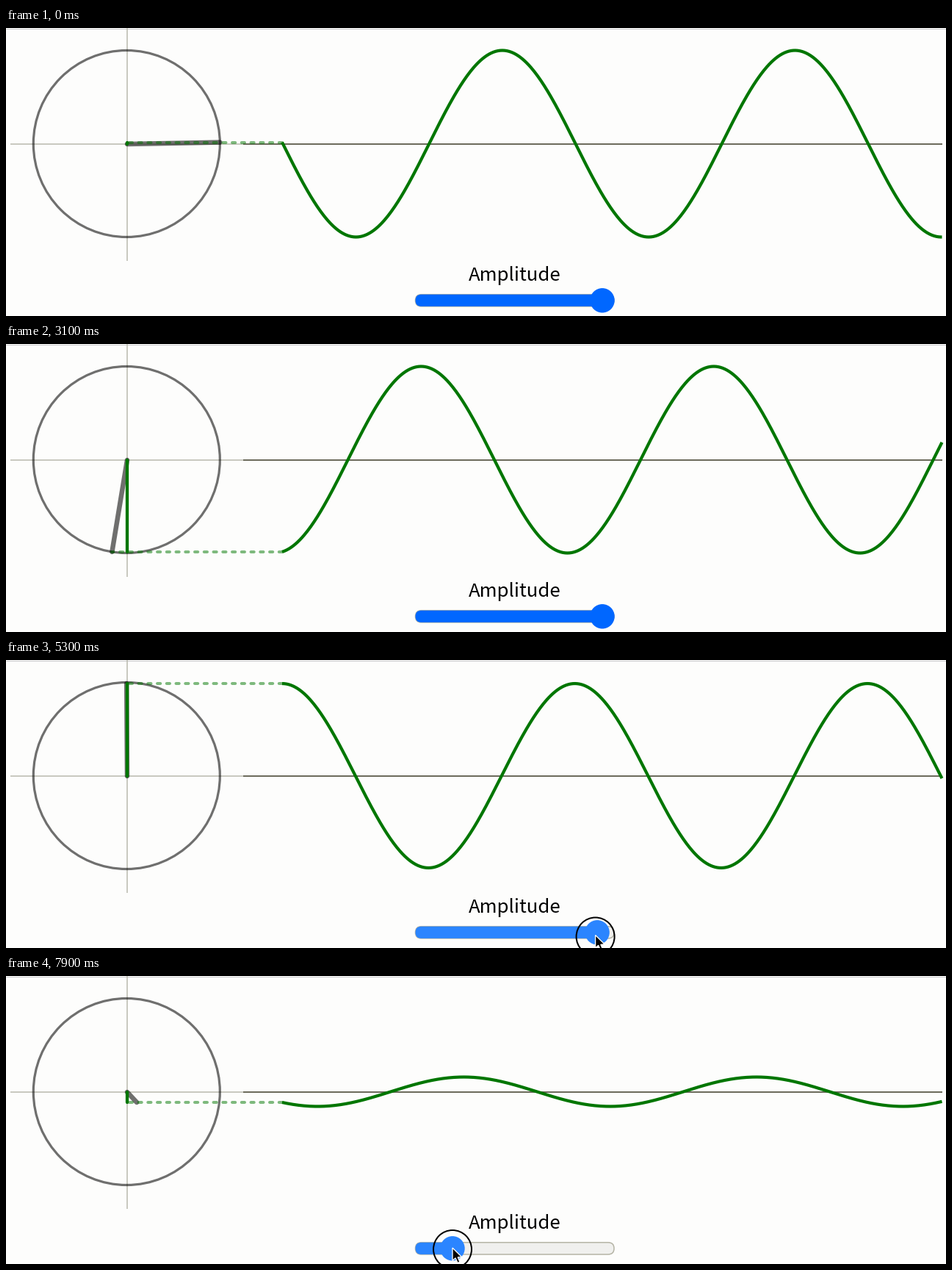
These frames come from a looping animation (1280x392 px, 8 s). A matplotlib script:

```python
import numpy as np
import matplotlib.pyplot as plt
from matplotlib.animation import FuncAnimation
from matplotlib.patches import Circle, FancyBboxPatch, Polygon

W, H, DPI = 1280, 392, 100
FRAMES, INTERVAL = 80, 100
PT = 72 / DPI

CX, CY, RADIUS = 164.3, 157.5, 127
BASE = (165, 158)
WAVE_X0, WAVE_X1, WAVELENGTH = 376, 1274.5, 398.5
TRACK_X0, TRACK_X1, TRACK_Y = 557.5, 828, 370.8
KNOB_MAX = 812

BG = "#fdfdfc"
GREEN = "#007600"
GREY = (0, 0, 0, 0.56)
BLUE, BLUE_HOVER = "#0067ff", "#2b85ff"

fig = plt.figure(figsize=(W / DPI, H / DPI), dpi=DPI, facecolor=BG)
ax = fig.add_axes([0, 0, 1, 1])
ax.set_xlim(0, W)
ax.set_ylim(H, 0)
ax.axis("off")


def line(xs, ys, color, width, z, cap="butt", **kw):
    return ax.plot(xs, ys, color=color, lw=width * PT, zorder=z,
                   solid_capstyle=cap, solid_joinstyle="round", **kw)[0]


def pill(x0, x1, z, **kw):
    """Rounded slider bar between x0 and x1."""
    r = 8
    return ax.add_patch(FancyBboxPatch(
        (x0 + r, TRACK_Y - 0.1), x1 - x0 - 2 * r, 0.2,
        boxstyle=f"round,pad={r}", zorder=z, **kw))


# Frame edges and axes
line([0, W], [0.5, 0.5], "#c9c9cb", 1, 1)
line([0, W], [391.5, 391.5], "#c9c9cb", 1, 1)
line([164.5, 164.5], [0, 317], "#b9b9ad", 1.5, 2)
line([6, 323], [157.5, 157.5], "#b9b9ad", 1.5, 2)
line([323, 1274.5], [157.5, 157.5], "#6c6b5c", 2, 2)

# Rotating arm and its projection
ax.add_patch(Circle((CX, CY), RADIUS, fill=False, ec=GREY, lw=3.2 * PT, zorder=3))
arm = line([], [], GREY, 6.5, 4, "round")
dash = line([], [], GREEN, 4, 5, alpha=0.5, dash_capstyle="round")
dash.set_linestyle((0, (4.25 / 4, 8.5 / 4)))
height = line([], [], GREEN, 4.3, 6, "round")
wave = line([], [], GREEN, 4.2, 7)
wave_x = np.linspace(WAVE_X0, WAVE_X1, 600)

# Slider
ax.text(692.5, 344, "Amplitude", family="Noto Sans CJK JP", size=25.8 * PT,
        color="black", ha="center", va="baseline", zorder=8)
pill(TRACK_X0, TRACK_X1, 8, fc="#f0f0ee", ec="#b4b3a4", lw=1.5 * PT)
fill = pill(TRACK_X0, KNOB_MAX, 9, lw=0)
knob = ax.add_patch(Circle((KNOB_MAX, TRACK_Y), 16.7, lw=0, zorder=10))

# Mouse pointer with its highlight ring
ARROW = np.array([(0, 0), (0, 17.5), (4, 13.8), (7, 20.5), (10, 19.2),
                  (7.2, 12.8), (12.5, 12.4)])
ring = ax.add_patch(Circle((0, 0), 26, fill=False, ec="black", lw=2 * PT, zorder=11))
arrow = ax.add_patch(Polygon(ARROW, fc="black", ec="white", lw=1.3 * PT, zorder=12))


def update(i):
    angle = max(0.015, 0.15 * i - 0.095)
    knob_x = np.interp(i, [52, 63, 79], [KNOB_MAX, 736, 608])
    amp = min(RADIUS, 20 + 0.535 * (knob_x - 608))

    tip_x = CX + amp * np.cos(angle)
    tip_y = CY - amp * np.sin(angle)
    arm.set_data([BASE[0], tip_x], [BASE[1], tip_y])
    height.set_data([BASE[0]] * 2, [BASE[1], tip_y])
    dash.set_data([WAVE_X0, min(BASE[0], tip_x)], [tip_y, tip_y])
    shift = 2 * np.pi * (wave_x - WAVE_X0) / WAVELENGTH
    wave.set_data(wave_x, CY - amp * np.sin(angle - shift))

    # The pointer rises from below, then drags the knob left
    mouse_x = np.interp(i, [39, 43, 52, 63, 79], [806, 809.5, 809.5, 733.5, 608])
    mouse_y = np.interp(i, [39, 43, 63, 79], [440, 376, 377, 372])
    ring.center = (mouse_x, mouse_y)
    arrow.set_xy(ARROW + (mouse_x, mouse_y - 2))

    color = BLUE_HOVER if i >= 43 else BLUE
    fill.set_width(knob_x - TRACK_X0 - 16)
    fill.set_facecolor(color)
    knob.center = (knob_x, TRACK_Y)
    knob.set_facecolor(color)
    return arm, height, dash, wave, ring, arrow, fill, knob


anim = FuncAnimation(fig, update, frames=FRAMES, interval=INTERVAL,
                     repeat=True, repeat_delay=0, blit=False)
plt.show()
```
